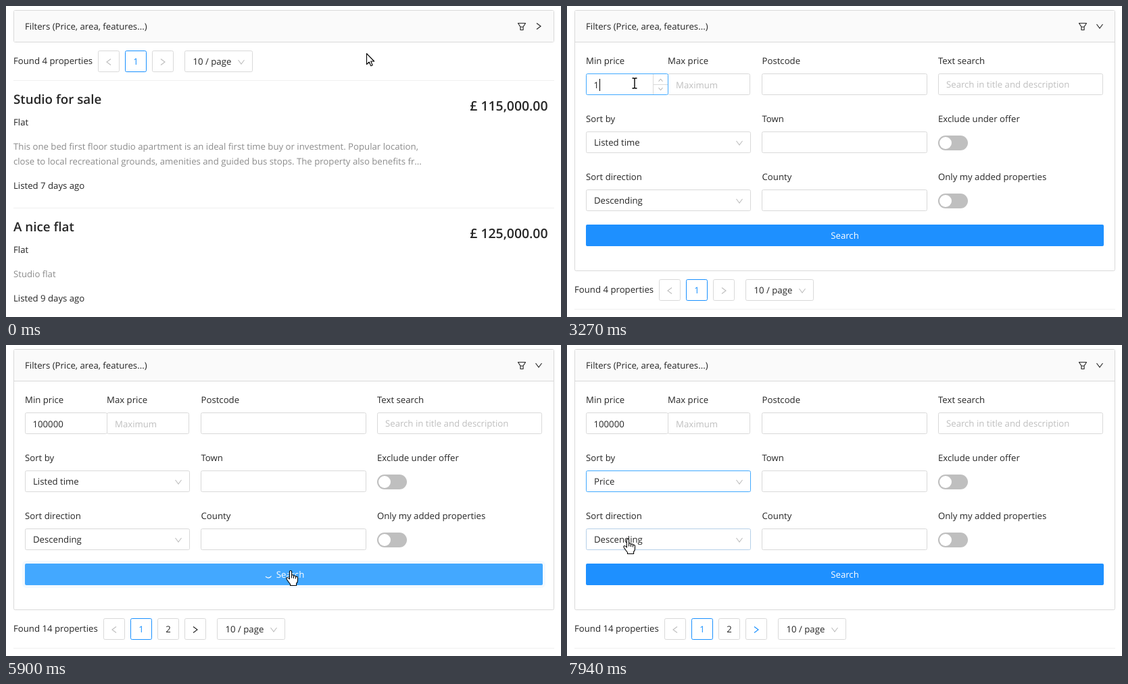
These frames come from a looping animation (821 by 461 pixels, 8 s). An HTML page:

```html
<!DOCTYPE html>
<html lang="en">
<head>
<meta charset="utf-8">
<title>Property search</title>
<style>
  html, body { margin: 0; width: 100%; height: 100%; overflow: hidden; background: #fff; }
  svg { display: block; width: 821px; height: 461px; }
  text {
    font: 13.2px "Open Sans", "Noto Sans", sans-serif;
    fill: #262626; text-rendering: geometricPrecision; white-space: pre;
  }
  .title { font-size: 18.8px; font-weight: 600; }
  .price { font-size: 19.4px; font-weight: 600; text-anchor: end; }
  .mid { text-anchor: middle; }
  .soft { fill: #8c8c8c; }
  .hint { fill: #bfbfbf; }
  .page { fill: #1890ff; font-weight: 500; text-anchor: middle; }
  .bold { font-size: 13px; font-weight: 600; }
  .white { fill: #fff; }
  .box { fill: #fff; stroke: #d9d9d9; }
  .line { fill: none; stroke-width: 1.15; }
  .pointer { fill: #fff; stroke: #000; stroke-width: 1.1; stroke-linejoin: round; }
  #menu { filter: drop-shadow(0 4px 8px rgba(0,0,0,.16)); }
</style>
</head>
<body>
<svg id="stage" viewBox="0 0 821 461"></svg>
<script>
const LOOP = 8000, BLUE = '#40a9ff', GREY = '#d9d9d9', DIM = '#bfbfbf', INK = '#262626', OPEN = 339;

const text = (x, y, s, cls = '', id = '') => `<text id="${id}" x="${x}" y="${y}" class="${cls}">${s}</text>`;
const box = (x, y, w, h, id = '') =>
  `<rect id="${id}" class="box" x="${x + .5}" y="${y + .5}" width="${w - 1}" height="${h - 1}" rx="2"/>`;
const chevron = (x, y, turn, color = DIM, size = 1, id = '') =>
  `<path id="${id}" class="line" stroke="${color}" transform="translate(${x} ${y}) rotate(${turn}) scale(${size})" d="M-3 -4.5L3 0L-3 4.5"/>`;
const rule = y => `<path d="M11 ${y + .5}H811" stroke="#f0f0f0"/>`;
const toggle = y => `<rect x="549" y="${y}" width="44" height="22" rx="11" fill="${DIM}"/>
  <circle cx="560" cy="${y + 11}" r="9" fill="#fff"/>`;

function pager(id, found, x, pages) {
  let out = text(11, 86, `Found ${found} properties`) + box(x, 66, 32, 32) + chevron(x + 16, 83, 180);
  for (let n = 1; n <= pages; n++) {
    x += 40;
    out += box(x, 66, 32, 32, n === 1 ? id + 'Current' : '') + text(x + 16, 87, n, n === 1 ? 'page' : 'mid');
  }
  x += 40;
  out += box(x, 66, 32, 32) + chevron(x + 16, 83, 0, pages > 1 ? INK : DIM, 1, id + 'Next');
  x += 48;
  out += box(x, 66, 101, 32) + text(x + 12.5, 87, '10 / page') + chevron(x + 84, 83, 90);
  return `<g id="${id}">${out}</g>`;
}

function listing(y, title, price, lines, age) {
  const last = y + 103 + 22 * (lines.length - 1);
  return rule(y) + text(11, y + 35, title, 'title') + text(801.5, y + 45, price, 'price') +
    text(11, y + 67, 'Flat') +
    lines.map((s, i) => text(11, y + 103 + 22 * i, s, 'soft')).join('') +
    text(11, last + 36, `Listed ${age} days ago`);
}

const labels = [
  [28, 86, 'Min price'], [149, 86, 'Max price'], [288.5, 86, 'Postcode'], [549, 86, 'Text search'],
  [28, 172, 'Sort by'], [288.5, 172, 'Town'], [549, 172, 'Exclude under offer'],
  [28, 258, 'Sort direction'], [288.5, 258, 'County'], [549, 258, 'Only my added properties']
];

const form = `<g id="form">
  <path d="M12 53.5H810" stroke="${GREY}"/>
  ${labels.map(l => text(...l)).join('')}
  ${box(149, 100, 122, 32, 'max')}${text(161, 122, 'Maximum', 'hint')}
  ${box(28, 100, 122, 32, 'min')}${text(40, 122, 'Minimum', 'hint', 'minHint')}${text(39.5, 122, '', '', 'minText')}
  <g id="stepper"><path d="M127.5 101V131M127 116.5H149" stroke="${GREY}"/>
    ${chevron(138.5, 110, -90, '#8c8c8c', .65)}${chevron(138.5, 123, 90, '#8c8c8c', .65)}</g>
  <rect id="caret" y="108" width="1" height="18" fill="#000"/>
  ${[100, 186, 272].map(y => box(288, y, 245, 32)).join('')}
  ${box(549, 100, 244, 32)}${text(561, 121, 'Search in title and description', 'hint')}
  ${box(28, 186, 244, 32, 'sort')}${text(40, 207, '', '', 'sortText')}${chevron(255, 203, 90)}
  ${box(28, 272, 244, 32, 'dir')}${text(40, 293, 'Descending')}${chevron(255, 289, 90)}
  ${toggle(192)}${toggle(278)}
  <rect id="wave" x="26" y="322" width="770" height="36" rx="4" fill="none" stroke="#1890ff" stroke-width="4"/>
  <rect id="button" x="28" y="324" width="766" height="32" rx="2"/>
  ${text(411, 345, 'Search', 'white mid', 'search')}
  <path id="loader" class="line" stroke="#fff" d="M4.5 2.5A5.2 5.2 0 0 1 -4 3.2"/>
  <g id="menu"><rect x="28" y="222" width="245" height="104" rx="2" fill="#fff"/>
    <rect x="28" y="226" width="245" height="32" fill="#e6f7ff"/>
    <rect id="priceRow" x="28" y="258" width="245" height="32" fill="#f5f5f5"/>
    ${text(40, 247, 'Listed time', 'bold')}${text(40, 279, 'Price')}${text(40, 311, 'Type')}</g>
</g>`;

const pointers = `
  <path id="arrow" class="pointer" d="M.5 .5V16.5L4.2 13L6.8 18.8L9.2 17.8L6.7 12H11.7Z"/>
  <path id="hand" class="pointer" d="M-1.6 2Q-1.6 .5 0 .5Q1.6 .5 1.6 2V7Q4.5 6.2 4.5 8.3Q7.5 7.3 7.5 9.3Q10.5 8.8 10.5 11V15Q10.5 18 8.6 19.5V22.5H-.5V20.5Q-3 17.5 -5.5 13.8Q-6.8 11.4 -5.2 10.8Q-3.6 10.3 -1.6 13ZM1.6 7V11.5M4.5 8.3V12M7.5 9.3V12.5"/>
  <path id="beam" fill="none" stroke="#000" stroke-width="1.4" d="M-3.5 -7H-1L0 -6L1 -7H3.5M0 -6V7M-3.5 8H-1L0 7L1 8H3.5"/>`;

const $ = id => document.getElementById(id);
$('stage').innerHTML = `
  <g id="rest">
    ${pager('few', 4, 136, 1)}${pager('many', 14, 144, 2)}
    ${listing(110, 'Studio for sale', '£ 115,000.00', [
      'This one bed first floor studio apartment is an ideal first time buy or investment. Popular location,',
      'close to local recreational grounds, amenities and guided bus stops. The property also benefits fr...'], 7)}
    ${listing(299, 'A nice flat', '£ 125,000.00', ['Studio flat'], 9)}
  </g>
  ${box(11, 6, 800, 48, 'panel')}
  <rect x="12" y="7" width="798" height="46" fill="#fafafa"/>
  ${text(28, 35, 'Filters (Price, area, features...)')}
  <path class="line" stroke="${INK}" stroke-linejoin="round" d="M757.5 25.5H768.5L765 31V35.5H761V31ZM761 31H765"/>
  ${chevron(788, 30, 0, INK, 1, 'fold')}
  ${form}${pointers}`;
for (const id of ['fewCurrent', 'manyCurrent']) $(id).setAttribute('stroke', '#1890ff');
for (const id of ['fewCurrent', 'manyCurrent']) $(id).style.stroke = '#1890ff';

const start = {
  at: ['arrow', 533, 70], open: 0, min: GREY, max: GREY, sort: GREY, dir: GREY,
  stepper: false, caret: false, value: '', button: '#1e90ff', wave: 0, load: -1, shift: 0,
  many: false, next: INK, menu: false, priceRow: false, sortText: 'Listed time'
};
// Each step changes only the listed parts and holds until the next.
const steps = [
  [610, { at: ['arrow', 530, 56] }],
  [820, { at: ['hand', 526, 38] }],
  [1030, { at: ['hand', 525, 35], open: 1 }],
  [1230, { open: OPEN }],
  [1430, { at: ['arrow', 370, 76] }],
  [1630, { at: ['beam', 200, 115], max: BLUE }],
  [1830, { at: ['beam', 112, 114], max: GREY, min: BLUE, stepper: true }],
  [2040, { at: ['beam', 100, 114] }],
  [2250, { caret: true }],
  [2650, { caret: false }],
  [3050, { caret: true }],
  [3270, { value: '1' }],
  [3470, { value: '10' }],
  [3670, { value: '100' }],
  [4070, { value: '10000' }],
  [4270, { value: '100000' }],
  [4900, { at: ['arrow', 145, 150], stepper: false }],
  [5100, { at: ['arrow', 280, 248] }],
  [5300, { at: ['hand', 412, 328], button: BLUE }],
  [5500, { at: ['hand', 421, 334], button: '#268ef2', min: '#a3cbf3', caret: false }],
  [5700, { button: BLUE, min: GREY, wave: .22, load: 0, shift: 5 }],
  [5900, { button: '#43a8ff', wave: .05, load: 0, shift: 9.5, many: true }],
  [6100, { wave: 0, load: 72 }],
  [6300, { button: BLUE, load: -1, shift: 0, next: '#1890ff' }],
  [6510, { at: ['arrow', 350, 296], button: '#1e90ff' }],
  [6710, { at: ['arrow', 230, 235] }],
  [6920, { at: ['hand', 140, 207], sort: '#a3cbf3' }],
  [7120, { at: ['hand', 124, 203], sort: BLUE }],
  [7320, { at: ['hand', 115, 247], menu: true }],
  [7530, { at: ['hand', 102, 267], priceRow: true }],
  [7730, { at: ['hand', 98, 275], menu: false, sortText: 'Price' }],
  [7940, { at: ['hand', 90, 287], dir: '#b5cfe8' }]
];

const show = (id, on) => { $(id).style.display = on ? '' : 'none'; };
const move = (id, x, y, extra = '') => $(id).setAttribute('transform', `translate(${x} ${y}) ${extra}`);

function draw(t) {
  const s = Object.assign({}, start, ...steps.filter(([time]) => time <= t).map(([, change]) => change));
  const isOpen = s.open > 1;
  move('rest', 0, s.open);
  $('panel').setAttribute('height', 47 + s.open);
  move('fold', 788, 30, `rotate(${isOpen ? 90 : 0})`);
  show('form', isOpen);
  show('few', !s.many);
  show('many', s.many);
  $('manyNext').setAttribute('stroke', s.next);
  for (const id of ['min', 'max', 'sort', 'dir']) $(id).style.stroke = s[id];
  for (const id of ['stepper', 'caret', 'menu', 'priceRow']) show(id, s[id]);
  show('minHint', !s.value);
  $('minText').textContent = s.value;
  $('caret').setAttribute('x', Math.round(40 + 7.55 * s.value.length));
  $('sortText').textContent = s.sortText;
  $('sortText').style.fill = s.menu ? DIM : INK;
  $('button').setAttribute('fill', s.button);
  $('wave').style.opacity = s.wave;
  $('search').setAttribute('x', 411 + s.shift);
  show('loader', s.load >= 0);
  move('loader', 388, 340, `rotate(${s.load})`);
  const [kind, x, y] = s.at;
  for (const id of ['arrow', 'hand', 'beam']) show(id, id === kind);
  move(kind, x, y);
}

const begin = performance.now();
function tick() {
  draw((performance.now() - begin) % LOOP);
  requestAnimationFrame(tick);
}
tick();
</script>
</body>
</html>
```
